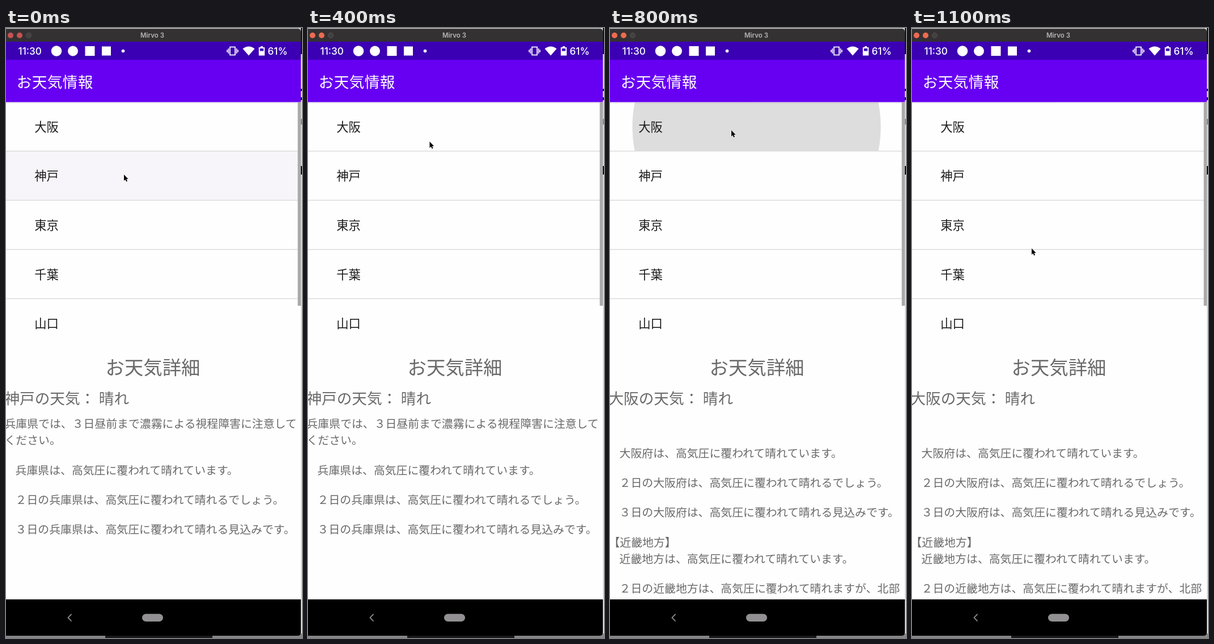
Animation, 522 px wide and 1074 px high, one loop 1200 ms. Source, as an HTML page:

```html
<!DOCTYPE html>
<html lang="ja">
<head>
<meta charset="utf-8">
<title>お天気情報</title>
<style>
html, body { margin: 0; width: 100%; height: 100%; overflow: hidden; background: #fefefe; }
svg { display: block; width: 522px; height: 1074px; }
text { font-family: "Noto Sans CJK JP", "Noto Sans CJK", "Noto Sans", sans-serif; text-spacing-trim: space-all; white-space: pre; }
.bar { font: 500 17.2px Inter, Roboto, sans-serif; fill: #fff; }
.title { font-size: 26.64px; letter-spacing: .0125em; fill: #fff; }
.body { font-size: 19.86px; fill: #6a6a6a; }
.head { font-size: 26.64px; word-spacing: .6px; fill: #6a6a6a; }
.city { font-size: 21.3px; fill: #1b1b1b; }
</style>
</head>
<body>
<svg viewBox="0 0 522 1074" xmlns="http://www.w3.org/2000/svg">
  <defs>
    <clipPath id="row"><rect y="131" width="520" height="85.5"/></clipPath>
    <clipPath id="page"><rect y="131" width="520" height="875"/></clipPath>
    <linearGradient id="shade" x2="0" y2="1">
      <stop stop-color="#000" stop-opacity=".08"/><stop offset="1" stop-color="#000" stop-opacity="0"/>
    </linearGradient>
  </defs>
  <rect width="522" height="1074" fill="#d8d8d8"/>
  <path d="M520 0h2v46h-2zM520 107h2v4h-2zM520 122h2v5h-2zM520 243h2v15h-2z" fill="#111"/>
  <rect x="520" y="160" width="2" height="10" fill="#8c8c8c"/>
  <rect y="1066" width="522" height="8" fill="#858585"/>
  <rect x="175" y="1069" width="189" height="5" fill="#191919"/>
  <rect y="24" width="520" height="1000" fill="#fefefe"/>

  <rect id="hover" y="217" width="520" height="86" fill="#f7f5f9"/>
  <g clip-path="url(#row)">
    <circle id="ripple" cx="258.5" cy="174" fill="#ddd"/>
    <rect id="press" y="131" width="520" height="86" fill="#e4e4e4"/>
  </g>
  <rect y="130.5" width="520" height="4" fill="url(#shade)"/>
  <g id="list"></g>
  <rect x="514.5" y="131" width="5.5" height="358" fill="#a9a9a9"/>

  <g clip-path="url(#page)">
    <text x="259" y="610" text-anchor="middle" font-size="33.4" fill="#6a6a6a">お天気詳細</text>
    <text id="today" class="head" x="-2.5" y="662"></text>
    <g id="kobe"></g>
    <g id="osaka"></g>
  </g>

  <path d="M0 1H514Q520 1 520 7V24H0Z" fill="#343132"/>
  <path d="M0 1.5H514" stroke="#5a5758"/>
  <circle id="red" cx="8" cy="13" r="5"/>
  <circle id="amber" cx="24" cy="13" r="5"/>
  <circle cx="40" cy="13" r="4.6" fill="#444142" stroke="#575455" stroke-width=".8"/>
  <text x="258" y="17" text-anchor="middle" style="font:600 11.5px Inter,sans-serif" fill="#b8b4b5">Mirvo 3</text>

  <rect y="24" width="520" height="32" fill="#3c00b4"/>
  <rect y="56" width="520" height="74.5" fill="#6700f2"/>
  <text class="title" x="18.8" y="105">お天気情報</text>
  <text class="bar" x="21.5" y="47">11:30</text>
  <text class="bar" x="461.5" y="47">61%</text>
  <g fill="#fff">
    <circle cx="89" cy="40.5" r="9.3"/>
    <circle cx="118" cy="40.5" r="9"/>
    <rect x="139.5" y="32" width="17" height="17"/>
    <rect x="169" y="32.5" width="16" height="16"/>
    <circle cx="206.5" cy="40.5" r="2.8"/>
    <path d="M417.5 36.5Q428 28.5 438.5 36.5L428 48.5Z"/>
    <path fill-rule="evenodd" d="M449 32h4v2h3.2v14.5h-10.4V34H449zM447.8 36v4.5h6.4V36z"/>
  </g>
  <g fill="none" stroke="#fff" stroke-width="1.7">
    <rect x="395" y="33.5" width="9" height="14"/>
    <path d="M392.4 36v9M406.6 36v9M390 38.5v4M409 38.5v4"/>
  </g>

  <path d="M0 1006H520V1064Q520 1070 514 1070H0Z" fill="#000"/>
  <path d="M115.5 1032L109.5 1038.2L115.5 1044.5" fill="none" stroke="#8c8c8c" stroke-width="1.8"/>
  <rect x="240" y="1031.5" width="37" height="13.5" rx="6.75" fill="#929092"/>

  <path id="cursor" d="M0 0V11L2.5 8.8L4.1 12.6L6 11.8L4.4 8.1H7.6Z" fill="#000" stroke="#fff" stroke-width="1" paint-order="stroke"/>
</svg>
<script>
const NS = "http://www.w3.org/2000/svg";
const $ = id => document.getElementById(id);

function add(parent, tag, attrs, text) {
  const el = document.createElementNS(NS, tag);
  for (const k in attrs) el.setAttribute(k, attrs[k]);
  if (text) el.textContent = text;
  $(parent).appendChild(el);
}

["大阪", "神戸", "東京", "千葉", "山口"].forEach((name, i) => {
  add("list", "text", { class: "city", x: 50.2, y: 181.8 + i * 86.6 }, name);
  if (i < 4) add("list", "rect", { y: 216 + i * 86.6, width: 520, height: 1.4, fill: "#dadada" });
});

const LEFT = -2.5, INDENT = 16.6, GAP = 52.3;
const line = (group, x, y, text) => add(group, "text", { class: "body", x, y }, text);

function forecast(group, place, y) {
  line(group, INDENT, y, place + "は、高気圧に覆われて晴れています。");
  line(group, INDENT, y + GAP, "２日の" + place + "は、高気圧に覆われて晴れるでしょう。");
  line(group, INDENT, y + 2 * GAP, "３日の" + place + "は、高気圧に覆われて晴れる見込みです。");
}

line("kobe", LEFT, 704.2, "兵庫県では、３日昼前まで濃霧による視程障害に注意して");
line("kobe", LEFT, 733.3, "ください。");
forecast("kobe", "兵庫県", 785.7);
forecast("osaka", "大阪府", 755.6);
line("osaka", LEFT, 912.6, "【近畿地方】");
line("osaka", INDENT, 941.8, "近畿地方は、高気圧に覆われて晴れています。");
line("osaka", INDENT, 994, "２日の近畿地方は、高気圧に覆われて晴れますが、北部");
line("osaka", LEFT, 1023, "では寒気の影響で曇る所があるでしょう。");

// pointer tip at each 100 ms step
const path = [[208, 258], [211, 255], [213, 250], [214, 228], [214.5, 200], [214.5, 181],
  [214.5, 176], [214.5, 176], [214, 180], [212, 298], [211, 368], [211, 388]];
const dimSteps = [0, 6, 9];

const show = (id, on) => $(id).setAttribute("visibility", on ? "visible" : "hidden");

function draw(ms) {
  const step = Math.floor(ms % 1200 / 100);
  const dim = dimSteps.includes(step);
  $("cursor").setAttribute("transform", `translate(${path[step]})`);
  $("red").setAttribute("fill", dim ? "#c65250" : "#ee6a52");
  $("amber").setAttribute("fill", dim ? "#c65250" : "#ec6b4e");

  show("hover", step === 0);
  show("ripple", step === 7 || step === 8);
  $("ripple").setAttribute("r", step === 7 ? 158.5 : 219);
  show("press", step === 9 || step === 10);
  $("press").setAttribute("opacity", step === 9 ? 1 : 0.3);

  $("today").textContent = (step < 7 ? "神戸" : "大阪") + "の天気： 晴れ";
  show("kobe", step < 8);
  show("osaka", step >= 8);
}

const start = performance.now();
function tick() {
  draw(performance.now() - start);
  requestAnimationFrame(tick);
}
tick();
</script>
</body>
</html>
```
